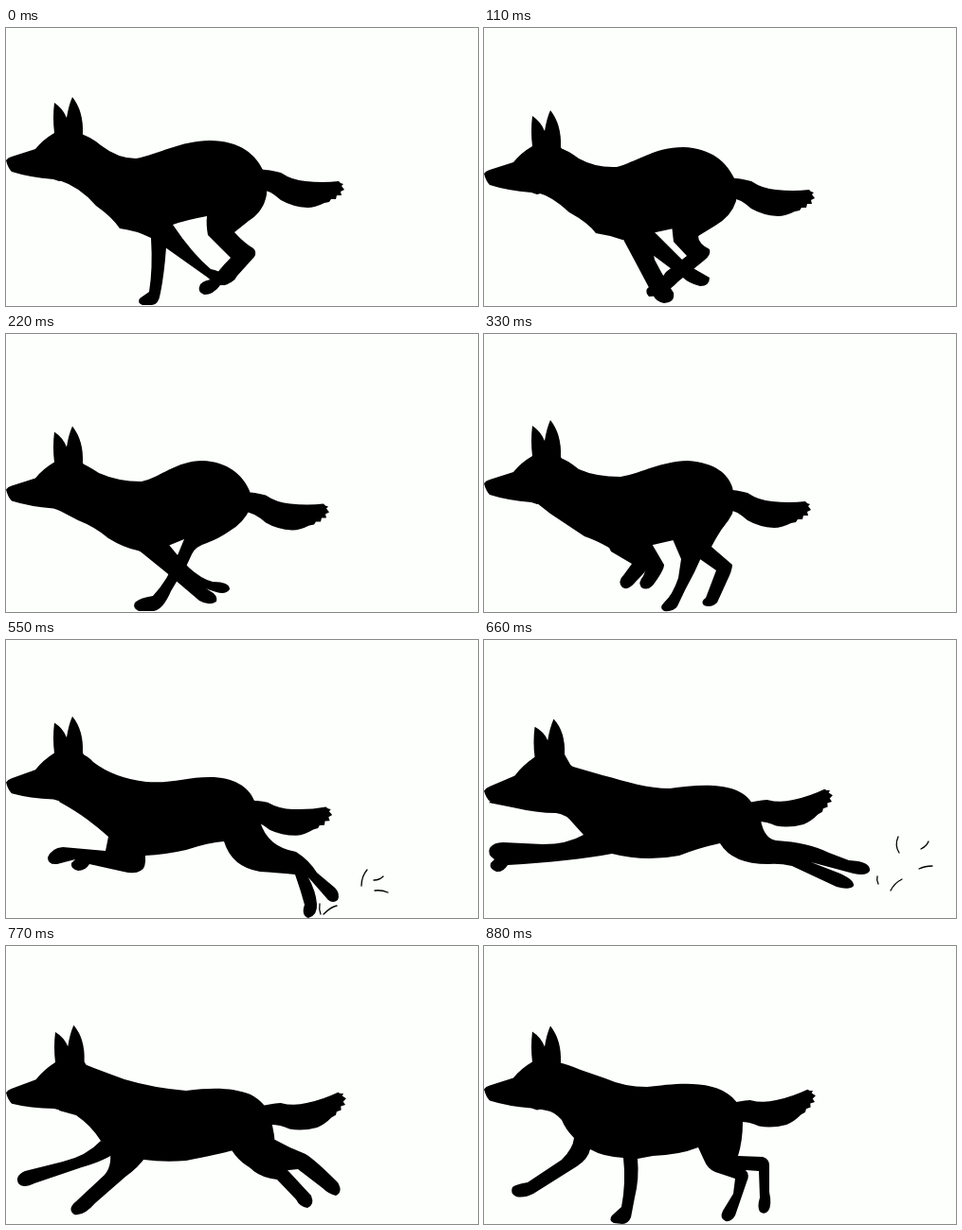
These frames come from a looping animation (498 by 294 pixels, 0.99 s). An HTML page without scripts:

```html
<!DOCTYPE html>
<html lang="en">
<head>
<meta charset="utf-8">
<title>Running dog silhouette</title>
<style>
html, body { margin: 0; height: 100%; overflow: hidden; background: #fdfffd; }
svg { display: block; width: 100%; height: 100%; }
/* nine poses of 110 ms, each shown in turn */
.pose {
  visibility: hidden;
  animation: show 990ms step-end infinite;
  animation-delay: calc(var(--i) * 110ms - 990ms);
}
@keyframes show {
  0% { visibility: visible; }
  11.1112%, 100% { visibility: hidden; }
}
.dust { fill: none; stroke: #000; stroke-width: 1.3; stroke-linecap: round; }
</style>
</head>
<body>
<svg viewBox="0 0 498 294" fill="#000">
  <defs>
    <path id="head" d="M0 140Q2 137 6 136L31 128Q39 118 51 111Q49 95 51 79Q60 85 64 95Q66 82 70 73Q82 88 81 112L100 150L56 162L50 160Q25 158 6 152Q2 148 0 140z"/>
    <path id="tail" d="M-8 -2Q8 -1 18 2Q30 10 44 11Q62 13 79 11l2 2l3 1l-2 2l3 4l-4 2l1 4l-5 0l-1 4l-5 0l-2 3l-5 1Q54 39 46 39Q30 38 18 31Q6 20 -6 19z"/>
  </defs>

  <!-- fore leg lands -->
  <g class="pose" style="--i:0">
    <use href="#head"/>
    <use href="#tail" transform="translate(272 151)"/>
    <path d="M78 112Q88 114 100 124Q118 138 137 138C160 134 185 119 215 119C247 119 264 134 272 152Q276 164 275 176Q272 194 256 204L241 216Q252 228 261 233Q265 237 262 242L244 262Q240 271 226 272Q219 282 209 282Q201 279 205 271Q210 266 219 266Q222 258 237 243L213 219Q211 208 212 199Q190 203 176 208L169 232Q167 260 163 280Q161 293 154 293L144 293Q138 291 141 286L151 279Q155 255 153 222Q137 214 120 212Q112 200 95 188Q78 168 56 161z"/>
    <path d="M166 205L176 208Q196 238 216 255Q224 256 236 264Q238 272 228 272Q218 270 213 264L168 232z"/>
  </g>

  <!-- legs pass under the body -->
  <g class="pose" style="--i:1">
    <use href="#head" y="14"/>
    <use href="#tail" transform="translate(264 160)"/>
    <path d="M78 126Q88 129 100 138Q118 148 140 147C160 142 180 126 210 126C240 127 256 142 264 159Q268 171 266 183Q261 199 244 209L226 220L200 212L172 218L146 224Q132 219 118 217Q110 206 90 195Q72 178 56 174z"/>
    <path d="M198 208L232 212L226 220Q226 228 238 234Q240 240 232 246L205 268Q190 284 174 284Q168 278 175 273Q186 268 192 258L214 241L200 226z"/>
    <path d="M144 218L174 212L180 245Q192 268 200 280Q202 290 190 291Q182 290 178 282L160 248z"/>
    <path d="M166 216L178 214L214 250Q224 256 238 264Q238 273 228 273Q216 270 210 264L170 234z"/>
  </g>

  <!-- gathered, legs crossed -->
  <g class="pose" style="--i:2">
    <use href="#head" y="24.5"/>
    <use href="#tail" transform="translate(256 168.5)"/>
    <path d="M78 136Q86 139 98 147Q118 156 143 156C162 152 180 134 207 134C234 135 250 149 257 166Q259 174 258 183Q252 199 235 209Q225 216 212 221Q199 225 196 233L190 246Q182 258 174 272Q166 291 156 293L140 293Q133 290 136 284Q141 279 155 277Q171 260 181 234L188 217L171 224L160 236L139 229Q124 226 108 216Q94 204 76 197L55 186z"/>
    <path d="M138 227L172 223L186 240L193 256Q203 264 214 271Q224 276 222 283Q214 288 204 282L170 253z"/>
    <path d="M162 226L171 224L193 247Q206 259 218 262Q236 262 236 270Q232 276 222 273L204 267L172 246z"/>
  </g>

  <!-- hind legs push -->
  <g class="pose" style="--i:3">
    <use href="#head" y="18"/>
    <use href="#tail" transform="translate(260 166)"/>
    <path d="M78 130Q88 133 100 143Q118 151 144 151C170 146 185 135 215 134C245 136 258 149 262 162Q266 176 262 190Q255 204 240 216L200 218L165 226L132 226Q118 218 106 214Q85 200 70 190L56 179z"/>
    <path d="M196 210L244 208Q232 222 232 230L222 252Q212 270 204 288Q200 294 190 293Q184 290 190 284Q199 276 205 258L208 238z"/>
    <path d="M215 210L255 200Q245 215 240 225L262 244Q262 250 256 262L246 284Q240 290 232 287Q228 283 234 279L245 250L225 236z"/>
    <path d="M130 222L172 222L178 238Q176 246 160 262Q152 272 146 268Q140 262 148 254L156 243L134 230z"/>
    <path d="M140 222L176 220L190 244Q190 250 178 266Q172 272 166 268Q162 263 168 256L172 246z"/>
  </g>

  <!-- fore legs lift, first dust -->
  <g class="pose" style="--i:4">
    <use href="#head" y="12"/>
    <use href="#tail" transform="translate(263 162)"/>
    <path d="M78 124Q88 125 95 134Q108 146 128 147C165 149 185 135 216 134C242 134 258 143 264 157Q270 168 268 186Q266 206 259 219L288 239Q294 242 293 250L285 280Q281 288 272 287Q266 285 269 279L276 274L278 253L246 234Q237 228 231 216Q234 236 238 247Q231 266 227 286Q224 294 218 294Q209 294 211 287L218 279L223 251L214 228L210 203Q194 214 170 221Q168 230 160 236L136 253L132 265Q128 272 123 270Q118 264 122 252L131 243L107 245Q99 247 96 253Q90 258 86 254Q84 245 92 239L131 229L126 220Q108 216 92 207Q74 182 56 173z"/>
    <path class="dust" d="M306 266Q296 271 296 281M313 272L303 277M303 279L313 284"/>
  </g>

  <!-- take-off -->
  <g class="pose" style="--i:5">
    <use href="#head" transform="matrix(1 -.04 0 1 0 10.5)"/>
    <use href="#tail" transform="translate(258 171) rotate(-4)"/>
    <path d="M78 120Q86 122 92 129Q114 146 148 150C175 152 190 145 215 145C240 145 256 155 262 170Q264 184 268 192Q276 219 306 224Q320 233 328 246L347 262Q353 268 350 275Q345 279 340 275L319 251Q327 266 328 279Q329 291 319 294Q311 291 315 280Q311 265 305 248Q284 246 268 245Q238 240 230 213Q214 214 190 222Q168 227 147 228Q148 242 142 244Q136 248 124 245L88 237Q84 244 76 244Q68 242 69 236L73 232L54 237Q44 238 44 230Q48 220 60 219L105 223L108 208Q98 199 86 190Q74 181 56 171z"/>
    <path class="dust" d="M381 243Q375 250 375 260M398 250Q394 254 388 254M389 265Q396 264 403 267M331 279Q330 285 332 290M349 281Q343 282 335 290"/>
  </g>

  <!-- full stretch -->
  <g class="pose" style="--i:6">
    <use href="#head" transform="matrix(1.05 -.13 0 1 0 19.5)"/>
    <use href="#tail" transform="translate(281 173) rotate(-19)"/>
    <path d="M82 127Q88 130 94 134L125 143C152 150 172 157 196 157C230 152 270 150 283 173Q291 184 293 195Q297 210 308 212Q342 214 364 225L385 233Q408 234 407 244Q404 250 390 247L345 235L376 247Q391 254 390 260Q386 265 372 261L325 239Q312 236 300 237Q262 237 249 215Q226 220 206 228Q170 235 135 226Q92 234 25 238Q20 246 13 245Q5 242 7 236L11 232Q3 227 6 220Q10 214 20 214L62 216Q88 216 105 206L95 195Q87 184 76 183Q56 183 30 177L5 172z"/>
    <path class="dust" d="M437 208Q433 217 438 225M469 213Q467 218 461 221M473 239Q465 239 459 242M415 250Q414 254 416 258M441 253Q433 257 429 265"/>
  </g>

  <!-- legs come down -->
  <g class="pose" style="--i:7">
    <use href="#head" transform="matrix(1.02 -.06 0 1 0 15)"/>
    <use href="#tail" transform="translate(272 170) rotate(-19)"/>
    <path d="M80 124Q95 130 125 141Q155 150 190 153C220 149 240 150 258 157Q275 166 279 182Q284 200 284 214L240 216Q225 220 190 227Q150 230 120 220L100 206Q90 190 74 179L56 174z"/>
    <path d="M236 212L284 205Q300 214 316 220Q326 226 350 250Q356 260 348 264Q340 262 334 256L308 236L270 240Q246 232 236 212z"/>
    <path d="M245 215L280 222L298 238L322 264Q326 274 318 277Q310 276 306 268L286 247Q256 244 245 215z"/>
    <path d="M100 206L120 215Q108 226 80 234L30 251Q18 257 13 251Q9 243 20 238L60 228Q85 222 100 206z"/>
    <path d="M108 210L148 222Q140 234 126 244L94 272Q82 286 72 284Q64 278 74 270L104 242Q114 230 108 210z"/>
  </g>

  <!-- reach -->
  <g class="pose" style="--i:8">
    <use href="#head" y="11.5"/>
    <use href="#tail" transform="translate(263 167) rotate(-19)"/>
    <path d="M78 123Q88 125 102 131L128 140Q148 149 172 149C200 146 240 140 262 160Q273 170 273 186Q273 206 268 222L294 223Q301 225 301 232L301 260Q304 274 300 280Q296 285 291 281Q288 276 291 266L290 238L276 237Q281 242 277 250L265 285Q261 292 255 291Q248 288 252 280L263 262L265 246L244 239Q236 236 232 226L226 213Q206 221 178 222L162 225Q164 246 159 266L155 287Q152 294 146 294L137 293Q131 290 135 285L145 276Q150 250 147 224Q126 223 112 215Q110 225 98 233L52 262Q42 267 34 265Q27 262 30 255Q34 252 46 250L82 226Q94 214 95 203Q86 194 82 184Q74 175 66 174L56 172z"/>
  </g>
</svg>
</body>
</html>
```
